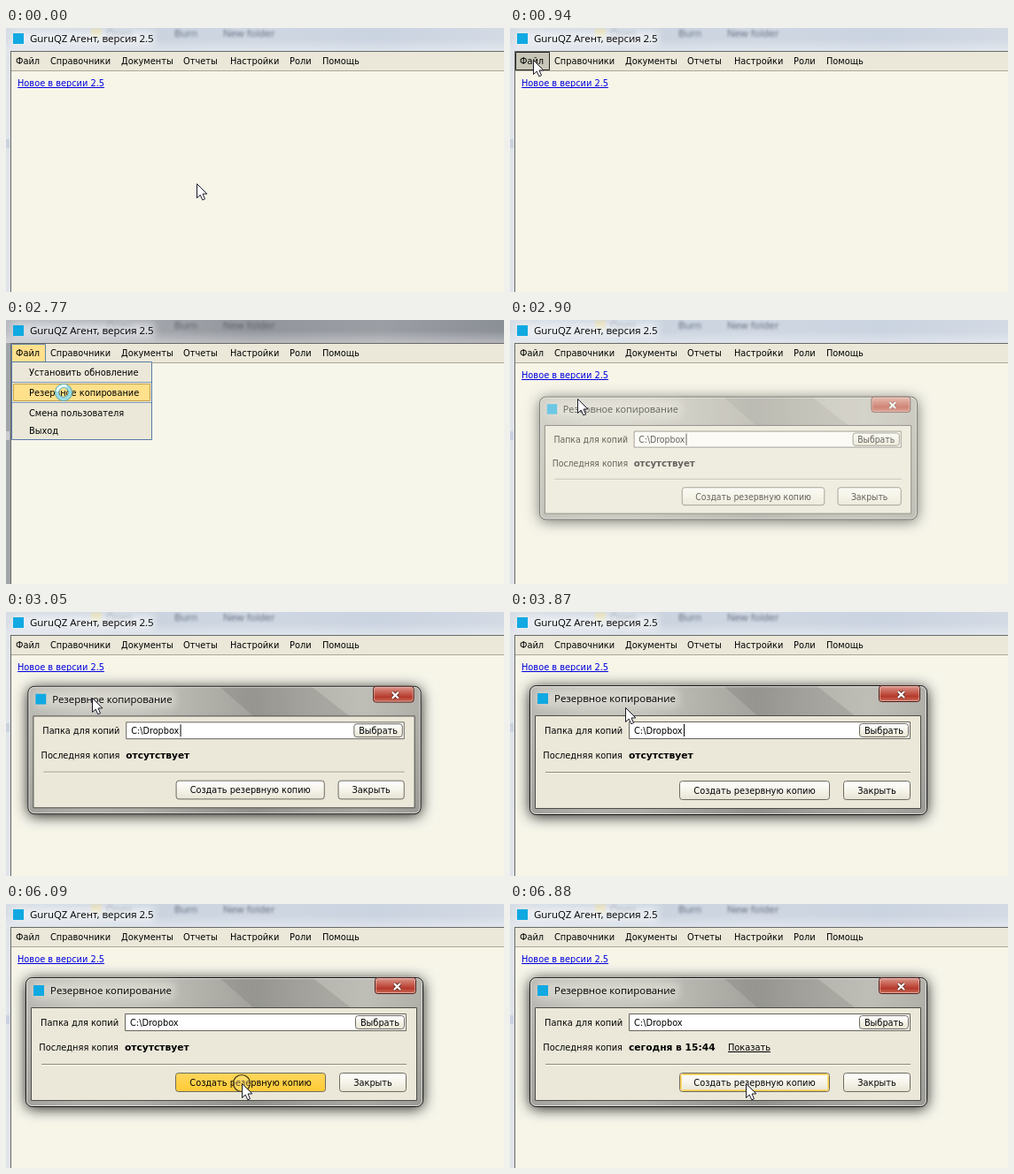
Write an HTML page with a canvas that moves like this. It is 562x299 px and loops after 7.99 s.

```html
<!DOCTYPE html>
<html lang="ru">
<head>
<meta charset="utf-8">
<title>Резервное копирование</title>
<style>
  html, body { margin: 0; width: 100%; height: 100%; overflow: hidden; background: #f7f5e8; }
  canvas { display: block; }
</style>
</head>
<body>
<canvas id="stage" width="562" height="299"></canvas>
<script>
const stage = document.getElementById('stage');
const ctx = stage.getContext('2d');
const backdrop = new OffscreenCanvas(stage.width, stage.height);
const LOOP = 7990;
const UI = '10.9px "DejaVu Sans Condensed", Roboto, "Liberation Sans", sans-serif';
const BOLD = 'bold 10.7px "DejaVu Sans", sans-serif';
const CAPTION = '11.45px "Open Sans", "Noto Sans", sans-serif';
const PANEL = '#ebe8d9', PAPER = '#f7f5e8', INK = '#000';

// Pointer stops: time, x, y
const POINTER = [
  [0, 215, 176], [260, 190, 152], [380, 154, 119], [520, 97, 84], [650, 50, 55],
  [790, 27, 37], [940, 26, 36], [1650, 32, 45], [1770, 44, 56], [1900, 58, 68],
  [2040, 64, 82], [2320, 65, 82], [2900, 76, 89], [3050, 97, 97], [3170, 108, 101],
  [3290, 116, 104], [3440, 120, 104], [3590, 122, 105], [3740, 126, 106], [3870, 130, 108],
  [4020, 134, 110], [4180, 139, 113], [4300, 147, 118], [4450, 167, 132], [4570, 189, 147],
  [4710, 220, 166], [4840, 250, 184], [4980, 258, 194], [5100, 264, 200], [5230, 266, 203]
];
const DIALOG_SCALE = [[2900, .95], [3050, .989], [3170, .996], [3290, 1]];
const CARET = [[2900, true], [3290, false], [3870, true], [4300, false], [4840, true], [5230, false], [5820, true], [6090, false]];

const stepAt = (steps, t) => steps.filter(s => s[0] <= t).pop();

function text(str, x, y, font = UI, color = INK, align = 'left') {
  ctx.font = font;
  ctx.fillStyle = color;
  ctx.textAlign = align;
  ctx.fillText(str, x, y);
}

function link(str, x, y, color) {
  text(str, x, y, UI, color);
  ctx.fillRect(x, y + 1, Math.round(ctx.measureText(str).width), 1);
}

function box(x, y, w, h, fill, stroke, radius = 0) {
  ctx.beginPath();
  ctx.roundRect(x + .5, y + .5, w - 1, h - 1, radius);
  if (fill) { ctx.fillStyle = fill; ctx.fill(); }
  if (stroke) { ctx.strokeStyle = stroke; ctx.lineWidth = 1; ctx.stroke(); }
}

function gradient(x0, y0, x1, y1, ...colors) {
  const g = ctx.createLinearGradient(x0, y0, x1, y1);
  colors.forEach((c, i) => g.addColorStop(i / (colors.length - 1), c));
  return g;
}

function blurred(radius, draw) {
  ctx.save();
  ctx.filter = `blur(${radius}px)`;
  draw();
  ctx.restore();
}

function caption(str, x, y, width, glow) {
  blurred(5, () => {
    ctx.fillStyle = glow;
    ctx.fillRect(x - 20, y - 13, width + 24, 18);
  });
  ctx.fillStyle = '#10a9e2';
  ctx.fillRect(x - 19, y - 10, 12, 12);
  text(str, x, y, CAPTION);
}

function mainWindow(dim, fileState) {
  ctx.fillStyle = dim
    ? gradient(0, 0, 562, 0, '#b7bac0', '#a5a8ae', '#92959b', '#9b9ea4', '#8b8f96')
    : gradient(0, 0, 562, 0, '#d6dce4', '#c9d2de', '#cfd7e2', '#cad3e0', '#d3dae4');
  ctx.fillRect(0, 0, 562, 299);
  ctx.fillStyle = gradient(0, 12, 0, 26, 'rgba(255,255,255,0)', 'rgba(255,255,255,.35)');
  ctx.fillRect(0, 12, 562, 14);
  blurred(1.4, () => {
    if (!dim) {
      ctx.fillStyle = '#e3d79a';
      ctx.fillRect(96, 1, 12, 10);
    }
    const shade = dim ? '#5a5e67' : '#5f697a';
    text('Open', 113, 10, CAPTION, shade);
    text('Burn', 190, 10, CAPTION, shade);
    text('New folder', 245, 10, CAPTION, shade);
  });
  caption('GuruQZ Агент, версия 2.5', 27, 16, 136, dim ? 'rgba(224,226,230,.85)' : 'rgba(240,243,246,.8)');

  ctx.fillStyle = dim ? '#a1a4a9' : '#e0e3e8';
  ctx.fillRect(0, 26, 5, 273);
  ctx.fillStyle = dim ? '#c9cbd0' : '#cbd2df';
  ctx.fillRect(0, 126, 4, 10);
  ctx.fillStyle = '#686868';
  ctx.fillRect(5, 26, 557, 273);
  ctx.fillStyle = PANEL;
  ctx.fillRect(6, 27, 556, 21);
  ctx.fillStyle = '#aaa798';
  ctx.fillRect(6, 48, 556, 1);
  ctx.fillStyle = dim ? '#f6f6eb' : PAPER;
  ctx.fillRect(6, 49, 556, 250);

  if (fileState === 'hover') box(6, 27, 39, 21, '#c8c6b6', '#222');
  if (fileState === 'open') box(6, 27, 39, 21, '#ffe08c', '#6484ac');
  [['Файл', 11], ['Справочники', 50], ['Документы', 130], ['Отчеты', 200],
   ['Настройки', 253], ['Роли', 320], ['Помощь', 357]].forEach(([s, x]) => text(s, x, 41));
  link('Новое в версии 2.5', 13, 66, '#0000df');
}

function fileMenu(selected) {
  box(6, 47, 159, 89, PANEL, '#587ba8');
  ctx.fillStyle = '#829bb9';
  ctx.fillRect(7, 70, 157, 1);
  ctx.fillRect(7, 93, 157, 1);
  if (selected >= 0) box(8, selected ? 72 : 49, 155, 20, '#ffe08b', '#c3a246');
  ['Установить обновление', 'Резервное копирование', 'Смена пользователя', 'Выход']
    .forEach((s, i) => text(s, 26, [63, 86, 109, 129][i]));
}

function button(label, x, y, w, h, state) {
  const fill = state === 'pressed'
    ? gradient(0, y, 0, y + h, '#ffd75d', '#ffca35')
    : gradient(0, y, 0, y + h, '#ffffff', '#f6f4ea', '#e6e3d3');
  box(x, y, w, h, fill, state === 'disabled' ? '#b9b6a9' : '#6d6a60', 3);
  if (state === 'hover') {
    box(x + 1, y + 1, w - 2, h - 2, null, '#fbcb50', 2);
    box(x + 2, y + 2, w - 4, h - 4, null, '#ffdb78', 1);
  }
  text(label, x + w / 2, y + h / 2 + 4, UI, state === 'disabled' ? '#9b988c' : INK, 'center');
}

function dialogFrame() {
  ctx.fillStyle = '#f7f6eb';
  ctx.fillRect(14, 70, 475, 177);
  ctx.save();
  ctx.shadowColor = 'rgba(0,0,0,.9)';
  ctx.shadowBlur = 16;
  ctx.shadowOffsetY = 2;
  box(22, 83, 449, 147, '#777', null, 7);
  ctx.restore();
  box(22, 83, 449, 147,
    gradient(22, 0, 471, 0, '#b9b8b2', '#c9c8c0', '#c6c5bd', '#b3b2ab', '#a4a39d', '#b5b4ad', '#bfbeb6', '#b0afa8'),
    null, 7);
  ctx.save();
  ctx.clip();
  ctx.fillStyle = gradient(0, 110, 0, 230, 'rgba(70,70,70,0)', 'rgba(70,70,70,.2)');
  ctx.fillRect(22, 110, 449, 120);
  ctx.fillStyle = 'rgba(70,70,70,.15)';
  ctx.beginPath();
  ctx.moveTo(240, 83); ctx.lineTo(345, 83); ctx.lineTo(390, 118); ctx.lineTo(280, 118);
  ctx.fill();
  ctx.restore();
  box(22, 83, 449, 147, null, '#151515', 7);
  box(23, 84, 447, 145, null, 'rgba(255,255,255,.6)', 6);
  caption('Резервное копирование', 50, 102, 136, 'rgba(222,221,213,.75)');

  box(416, 83, 47, 19, gradient(0, 83, 0, 102, '#dfa096', '#cb6a5c', '#b53a2b', '#d07563'), '#4b1b17', 3);
  box(417, 84, 45, 17, null, 'rgba(255,235,230,.45)', 2);
  for (const [color, width] of [['#67312b', 4], ['#fff', 2.2]]) {
    ctx.strokeStyle = color;
    ctx.lineWidth = width;
    ctx.beginPath();
    ctx.moveTo(438, 90); ctx.lineTo(445, 97);
    ctx.moveTo(445, 90); ctx.lineTo(438, 97);
    ctx.stroke();
  }
  box(28, 117, 436, 106, PANEL, '#4c4c49');
}

function dialog(t) {
  const busy = t >= 6210 && t < 6880;
  const done = t >= 6880;
  const scale = stepAt(DIALOG_SCALE, t)[1];
  const ink = busy ? '#9b988c' : INK;
  const idle = busy ? 'disabled' : 'normal';
  ctx.save();
  ctx.translate(246.5, 156.5);
  ctx.scale(scale, scale);
  ctx.translate(-246.5, -156.5);
  dialogFrame();

  text('Папка для копий', 127, 138, UI, ink, 'right');
  box(134, 124, 318, 20, busy ? '#f3f1e7' : '#fff', busy ? '#b9b6a9' : '#67645b');
  text('C:\\Dropbox', 140, 138, UI, ink);
  if (stepAt(CARET, t)[1]) {
    ctx.fillStyle = '#000';
    ctx.fillRect(196, 127, 1, 14);
  }
  button('Выбрать', 394, 126, 56, 16, idle);

  text('Последняя копия', 127, 166, UI, ink, 'right');
  if (busy) {
    box(136, 156, 225, 21, '#fff', '#a5a294');
    ctx.fillStyle = '#ffd24e';
    ctx.fillRect(138, 158, t < 6480 ? 70 : 221, 17);
  } else {
    text(done ? 'сегодня в 15:44' : 'отсутствует', 134, 166, BOLD);
    if (done) link('Показать', 246, 166, INK);
  }
  ctx.fillStyle = '#8c897d';
  ctx.fillRect(40, 181, 412, 1);
  ctx.fillStyle = '#f8f6eb';
  ctx.fillRect(40, 182, 412, 1);

  const create = busy ? 'disabled' : t >= 6090 && !done ? 'pressed' : t >= 4980 ? 'hover' : 'normal';
  button('Создать резервную копию', 191, 191, 170, 22, create);
  button('Закрыть', 376, 191, 76, 22, idle);
  ctx.restore();
}

// Lays a share of the bare window back over the drawn dialog
function fadedDialog(t, opacity) {
  backdrop.getContext('2d').drawImage(stage, 0, 0);
  dialog(t);
  ctx.globalAlpha = 1 - opacity;
  ctx.drawImage(backdrop, 0, 0);
  ctx.globalAlpha = 1;
}

function arrow(x, y) {
  ctx.save();
  ctx.translate(x + .5, y + .5);
  ctx.beginPath();
  [[0, 0], [0, 16], [3.7, 12.6], [6.3, 18.3], [9, 17.1], [6.5, 11.5], [11.4, 11.4]]
    .forEach(p => ctx.lineTo(...p));
  ctx.closePath();
  ctx.fillStyle = '#fff';
  ctx.fill();
  ctx.strokeStyle = '#1b1b2a';
  ctx.lineWidth = 1;
  ctx.stroke();
  ctx.restore();
}

function busyRing(x, y) {
  for (const [color, width, from, to] of [['#4b9fae', 5, 0, 7], ['#9bdce2', 3.4, 0, 7], ['#e3fafa', 3, 3.3, 5.2]]) {
    ctx.strokeStyle = color;
    ctx.lineWidth = width;
    ctx.beginPath();
    ctx.arc(x, y, 7.5, from, to);
    ctx.stroke();
  }
}

function clickMark(x, y) {
  ctx.beginPath();
  ctx.arc(x, y, 9.5, 0, 2 * Math.PI);
  ctx.fillStyle = 'rgba(255,232,140,.35)';
  ctx.fill();
  ctx.strokeStyle = '#40371c';
  ctx.lineWidth = 1.2;
  ctx.stroke();
}

function render(now) {
  const t = now % LOOP;
  const menuOpen = t >= 1500 && t < 2900;
  const loading = t >= 2770 && t < 2900;
  mainWindow(loading, menuOpen ? 'open' : t >= 790 && t < 1500 ? 'hover' : 'none');
  if (menuOpen) fileMenu(t >= 2040 ? 1 : t >= 1770 ? 0 : -1);
  if (t >= 3050) dialog(t);
  else if (t >= 2900) fadedDialog(t, .6);
  const [, x, y] = stepAt(POINTER, t);
  if (t >= 6090 && t < 6210) clickMark(x, y);
  if (loading) busyRing(x, y);
  else arrow(x, y);
}

function tick() {
  render(performance.now());
  requestAnimationFrame(tick);
}
tick();
</script>
</body>
</html>
```
